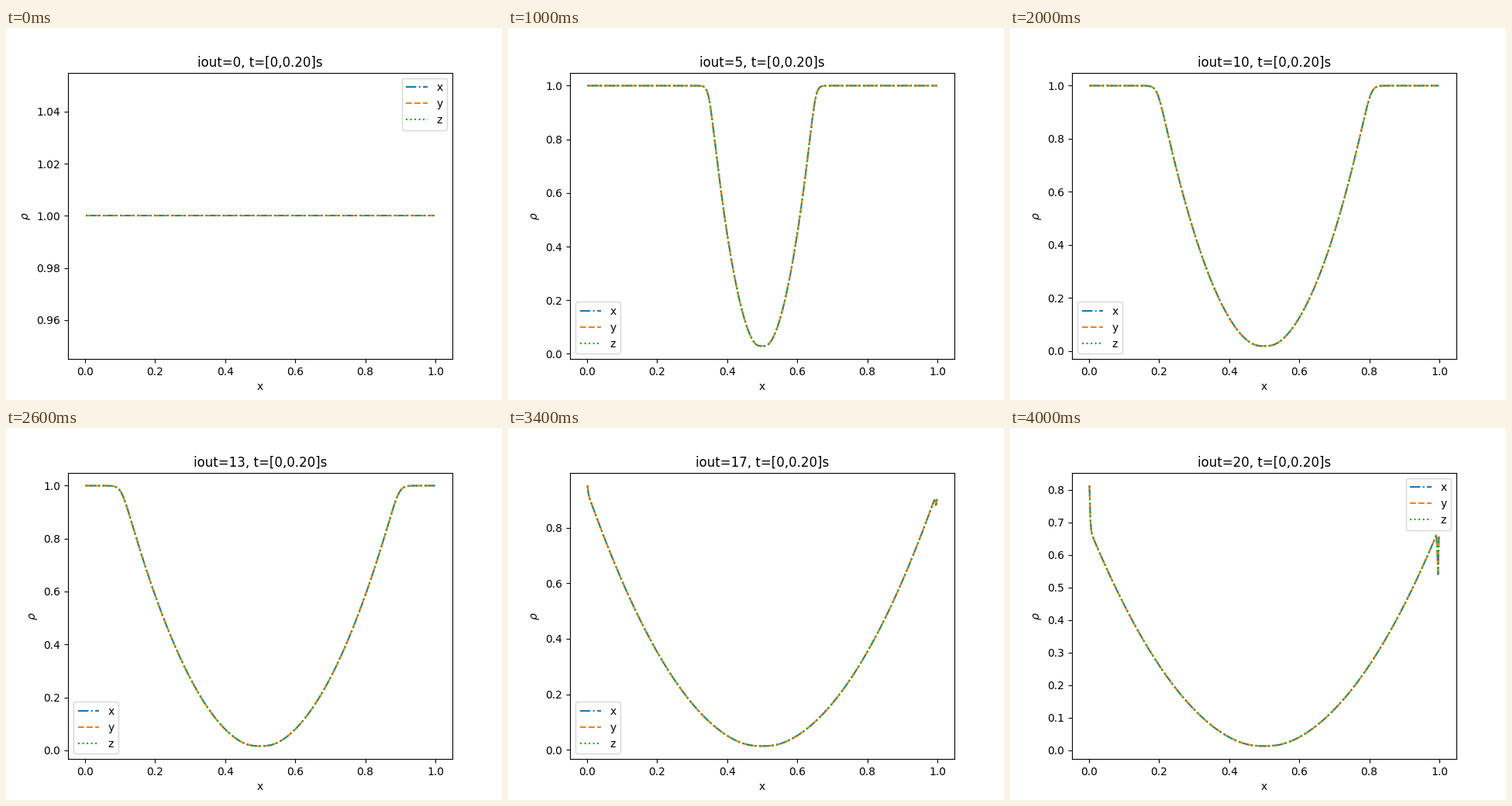
Write a matplotlib script that moves like this. It is 640 px wide and 480 px high and loops after 4200 ms.

```python
import numpy as np
import matplotlib.pyplot as plt
from matplotlib.animation import FuncAnimation

STEPS = 21
CELLS = 400
FRONT_SPEED = 0.0305   # distance the rarefaction head moves per output
FAN_SLOPE = 31.6

x = (np.arange(CELLS) + 0.5) / CELLS


def density(step):
    """Two rarefaction waves running apart from the middle of the domain."""
    if step == 0:
        return np.ones(CELLS)
    behind = FRONT_SPEED * step - np.abs(x - 0.5)
    width = 0.0025 * step ** 0.45
    depth = width * np.logaddexp(0, behind / width)
    fan = (1 - FAN_SLOPE * depth / step) ** 2
    floor = 0.04 * (step / 3) ** -0.63
    rho = np.hypot(fan, floor * (1 - fan))
    if step > 16:
        add_boundary_error(rho, step)
    return rho


def add_boundary_error(rho, step):
    """Spike at the left wall and zigzag at the right wall."""
    rho[:6] += 0.0355 * (step - 16.25) * np.exp(-1.3 * np.arange(6))
    dip = 0.04 + 0.031 * (step - 17)
    rho[-3] -= 0.3 * dip
    rho[-2] -= dip
    rho[-1] -= 0.022


fig, ax = plt.subplots(figsize=(6.4, 4.8), dpi=100)


def draw(step):
    ax.clear()
    rho = density(step)
    for name, style in zip("xyz", ("-.", "--", ":")):
        ax.plot(x, rho, style, label=name)
    ax.set_title(f"iout={step}, t=[0,0.20]s")
    ax.set_xlabel("x")
    ax.set_ylabel(r"$\rho$")
    ax.legend(loc="upper right" if step in (0, STEPS - 1) else "lower left")
    return ax.lines


anim = FuncAnimation(fig, draw, frames=STEPS, interval=200,
                     init_func=lambda: draw(0), repeat=True, repeat_delay=0)
plt.show()
```
